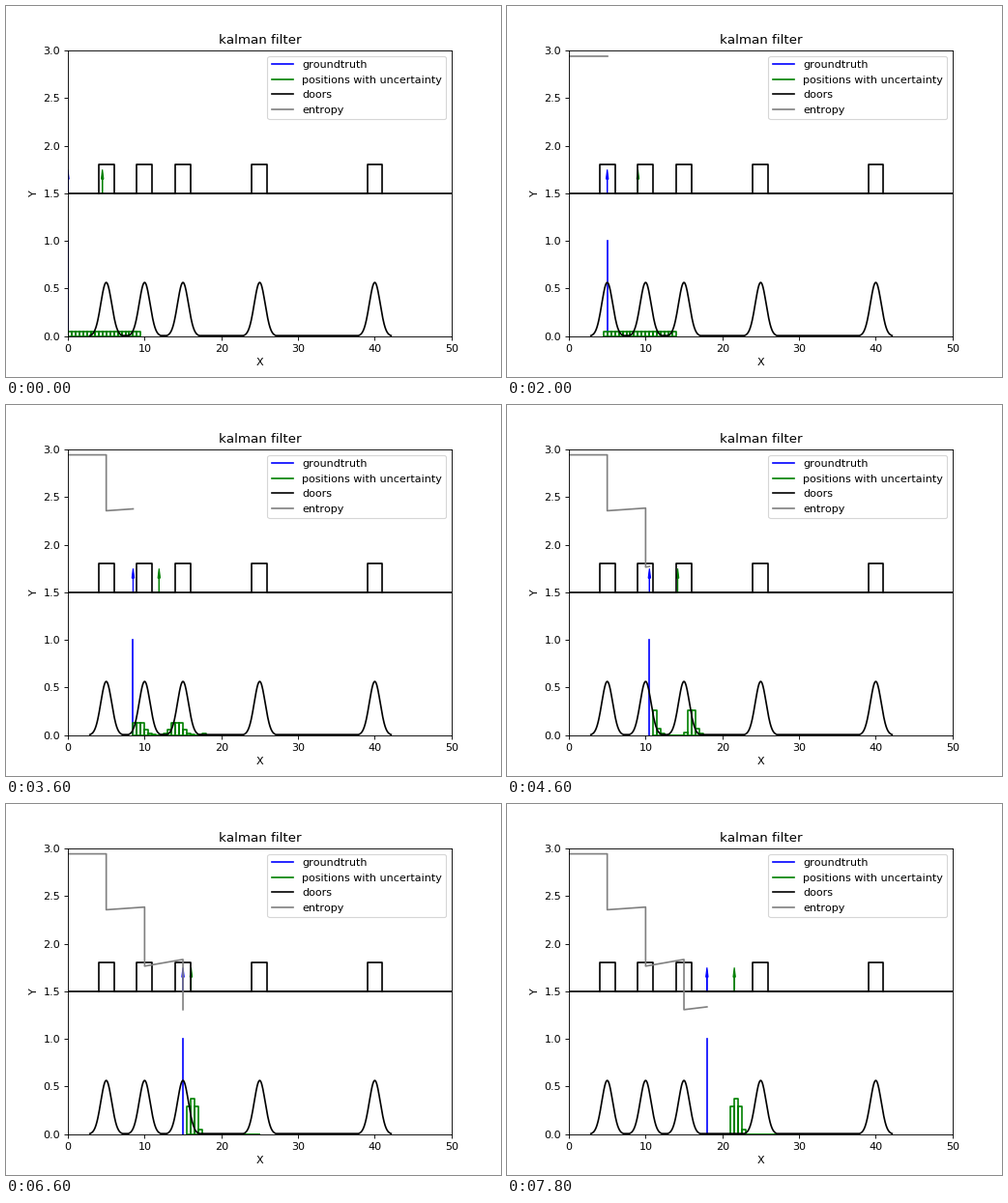
These frames come from a looping animation (512 by 384 pixels, 8000 ms). A matplotlib script:

```python
import numpy as np
import matplotlib.pyplot as plt
from matplotlib.animation import FuncAnimation

plt.rcParams["text.kerning_factor"] = 6

FRAMES = 40
STEP = 0.5
CELLS = STEP * np.arange(19)
DOORS = np.array([5, 10, 15, 25, 40])

# door sightings: frame, assumed start of the belief window, sensor slack
SIGHTINGS = [(11, 4.5, 0.5), (22, 10.5, 0), (33, 13.5, 0)]

# odometry of the belief window: frame, left edge
DRIFT = [(1, 0), (10, 4.5), (12, 4.5), (13, 5.5),
         (22, 10.5), (27, 13.5), (33, 15.5), (39, 21)]

# entropy at each turn: x, value
ENTROPY = [(0, 2.944), (5, 2.944), (5, 2.357), (10, 2.385),
           (10, 1.765), (15, 1.835), (15, 1.308), (18, 1.337)]


def sense(prior, start, slack):
    """Weigh the belief by the distance of each cell to the nearest door."""
    dist = np.abs(start + CELLS[:, None] - DOORS).min(axis=1)
    p = prior * np.exp(-2.1 * np.maximum(dist - slack, 0) ** 1.35)
    return p / p.sum()


beliefs = [np.full(CELLS.size, 1 / CELLS.size)]
for _, start, slack in SIGHTINGS:
    beliefs.append(sense(beliefs[-1], start, slack))


def door_outline():
    x = DOORS[:, None] + np.array([-1, -1, 1, 1])
    return x.ravel(), np.tile([1.5, 1.8, 1.8, 1.5], DOORS.size)


def door_sensor():
    sigma = np.sqrt(0.5)
    u = np.linspace(-3 * sigma, 3 * sigma, 100)
    y = np.exp(-u ** 2 / (2 * sigma ** 2)) / (sigma * np.sqrt(2 * np.pi))
    return (DOORS[:, None] + u).ravel(), np.tile(y, DOORS.size)


def bars(left, p):
    """One broken line tracing a box for every cell."""
    xs, ys = [], []
    for x, h in zip(left, p):
        xs += [x, x, x + STEP, x + STEP, x, np.nan]
        ys += [0, h, h, 0, 0, np.nan]
    return xs, ys


def entropy_path(pos, stage):
    """Entropy trace up to the robot, after the given number of sightings."""
    turn = 2 * stage
    value = np.interp(pos, *zip(*ENTROPY[turn:turn + 2]))
    return zip(*ENTROPY[:turn + 1], (pos, value))


fig, ax = plt.subplots(figsize=(6.4, 4.8), dpi=80)
ax.set(xlim=(0, 50), ylim=(0, 3), xlabel="X", ylabel="Y",
       title="kalman filter")

truth, = ax.plot([], [], color="blue", label="groundtruth", zorder=1.5)
hist, = ax.plot([], [], color="green", label="positions with uncertainty",
                zorder=1.5)
ax.plot(*door_outline(), color="black", label="doors")
ax.plot(*door_sensor(), color="black")
ax.axhline(1.5, color="black")
entropy, = ax.plot([], [], color="gray", label="entropy")
ax.legend(loc="upper right")

arrows = []


def point_at(x, color):
    arrows.append(ax.arrow(x, 1.5, 0, 0.15, head_width=0.3, head_length=0.1,
                           color=color))


def update(i):
    while arrows:
        arrows.pop().remove()
    stage = sum(i >= frame for frame, *_ in SIGHTINGS)
    pos = STEP * (i - stage)
    p = beliefs[stage]
    left = CELLS + STEP * round(np.interp(i, *zip(*DRIFT)) / STEP)

    truth.set_data([pos, pos], [0, 1])
    hist.set_data(*bars(left, p))
    entropy.set_data(*entropy_path(pos, stage))
    point_at(pos, "blue")
    point_at(np.average(left, weights=p), "green")
    return [truth, hist, entropy, *arrows]


anim = FuncAnimation(fig, update, frames=FRAMES, interval=200, repeat=True,
                     repeat_delay=0, blit=False)
plt.show()
```
